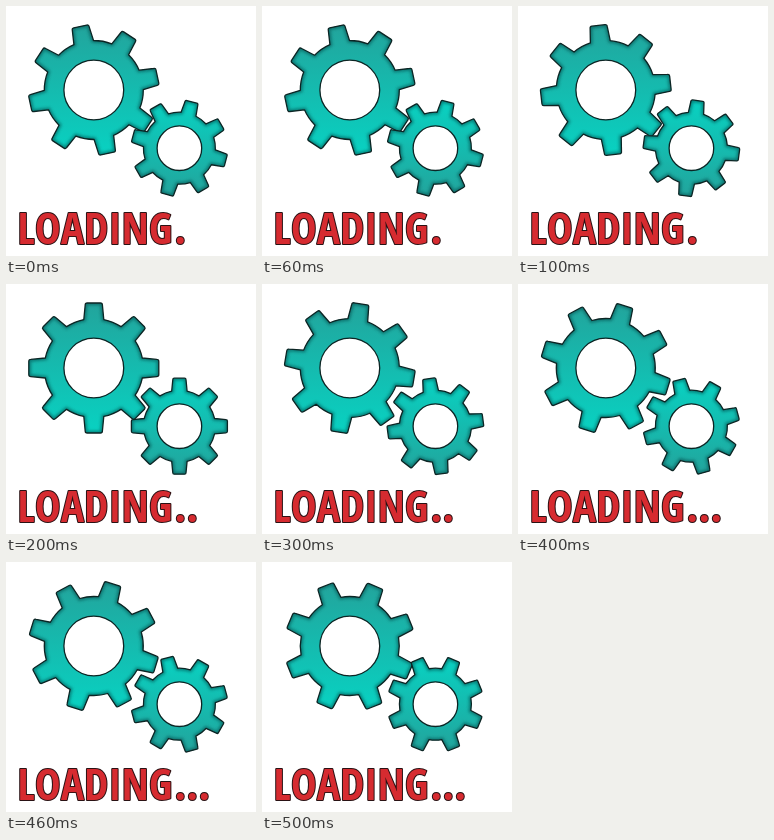
An HTML page that plays this animation: 250 px wide and 250 px high, repeating every 600 ms.

```html
<!DOCTYPE html>
<html lang="en">
<head>
<meta charset="utf-8">
<title>Loading</title>
<style>
  html, body { margin: 0; width: 100%; height: 100%; overflow: hidden; background: #fff; }
  svg { display: block; width: 100vw; height: 100vh; }
  .edge { fill: none; stroke: #0c2524; stroke-width: 1.3; stroke-linejoin: round; }
  .shade { fill: none; stroke: #0a4a48; stroke-width: 4.5; stroke-opacity: .55; filter: url(#soft); }
  text {
    font: bold 43px "Open Sans Condensed", "Open Sans", "Roboto Condensed", Roboto, sans-serif;
    font-stretch: 75%;
    fill: #d62b30; stroke: #2a1214; stroke-width: 2; paint-order: stroke; stroke-linejoin: round;
  }
  .word { letter-spacing: .3px; }
  .dot { text-anchor: middle; }
</style>
</head>
<body>
<svg id="stage" viewBox="0 0 250 250">
  <defs id="defs">
    <linearGradient id="down" x1="0" y1="0" x2="0" y2="1">
      <stop offset="0" stop-color="#22a49c"/>
      <stop offset="1" stop-color="#08d2c2"/>
    </linearGradient>
    <linearGradient id="up" x1="0" y1="1" x2="0" y2="0">
      <stop offset="0" stop-color="#22a49c"/>
      <stop offset="1" stop-color="#08d2c2"/>
    </linearGradient>
    <filter id="soft" x="-10%" y="-10%" width="120%" height="120%">
      <feGaussianBlur stdDeviation="1.6"/>
    </filter>
  </defs>
  <g id="gears"></g>
  <text class="word" x="11.5" y="238">LOADING</text>
  <g id="dots"></g>
</svg>
<script>
const NS = 'http://www.w3.org/2000/svg';
const LOOP = 600, STEPS = 6, TEETH = 8, PITCH = 360 / TEETH;
const byId = id => document.getElementById(id);

function add(parent, tag, attrs) {
  const el = document.createElementNS(NS, tag);
  for (const key in attrs) el.setAttribute(key, attrs[key]);
  return parent.appendChild(el);
}

// Toothed outline with softened tips, turned clockwise by deg
function rim({ x, y, tip, body, top, base, round }, deg) {
  const foot = Math.sqrt(body * body - base * base);
  let d = '';
  for (let i = 0; i <= TEETH; i++) {
    const a = (deg + i * PITCH) * Math.PI / 180, c = Math.cos(a), s = Math.sin(a);
    const at = (side, out) =>
      (x + side * c + out * s).toFixed(2) + ' ' + (y + side * s - out * c).toFixed(2);
    d += (i ? `A${body} ${body} 0 0 1 ` : 'M') + at(-base, foot);
    if (i < TEETH) {
      d += `L${at(-top, tip - round)}Q${at(-top, tip)} ${at(round - top, tip)}` +
        `L${at(top - round, tip)}Q${at(top, tip)} ${at(top, tip - round)}L${at(base, foot)}`;
    }
  }
  return d + 'Z';
}

const ring = ({ x, y, hole: r }) =>
  `M${x - r} ${y}a${r} ${r} 0 1 0 ${2 * r} 0a${r} ${r} 0 1 0 ${-2 * r} 0Z`;

const gears = [
  { x: 87.8, y: 84, tip: 65, body: 49.5, hole: 29.9, top: 8.6, base: 10, round: 2,
    fill: 'down', angles: [-12, -6.5, 0, 9.5, 17, 23] },
  { x: 173.4, y: 142.2, tip: 48, body: 36, hole: 22.3, top: 6.6, base: 7.7, round: 1.5,
    fill: 'up', angles: [15, 7.5, 0, -7.5, -15, -22.5] }
];

gears.forEach((gear, i) => {
  const clip = add(byId('defs'), 'clipPath', { id: 'clip' + i });
  const group = add(byId('gears'), 'g', {});
  gear.whole = [
    add(clip, 'path', { 'clip-rule': 'evenodd' }),
    add(group, 'path', { fill: `url(#${gear.fill})`, 'fill-rule': 'evenodd' })
  ];
  gear.shade = add(add(group, 'g', { 'clip-path': `url(#clip${i})` }), 'path', { class: 'shade' });
  gear.whole.push(add(group, 'path', { class: 'edge' }));
});

const dots = [174.2, 186.2, 198.2].map(x => {
  const dot = add(byId('dots'), 'text', { class: 'dot', x, y: 238 });
  dot.textContent = '.';
  return dot;
});

let shown = -1;
function draw(now) {
  const step = Math.floor(now % LOOP / LOOP * STEPS);
  if (step === shown) return;
  shown = step;
  for (const gear of gears) {
    const outer = rim(gear, gear.angles[step]);
    gear.shade.setAttribute('d', outer);
    gear.whole.forEach(path => path.setAttribute('d', outer + ring(gear)));
  }
  dots.forEach((dot, i) => dot.setAttribute('visibility', i <= step >> 1 ? 'visible' : 'hidden'));
}

const start = performance.now();
function tick() {
  draw(performance.now() - start);
  requestAnimationFrame(tick);
}
tick();
</script>
</body>
</html>
```
